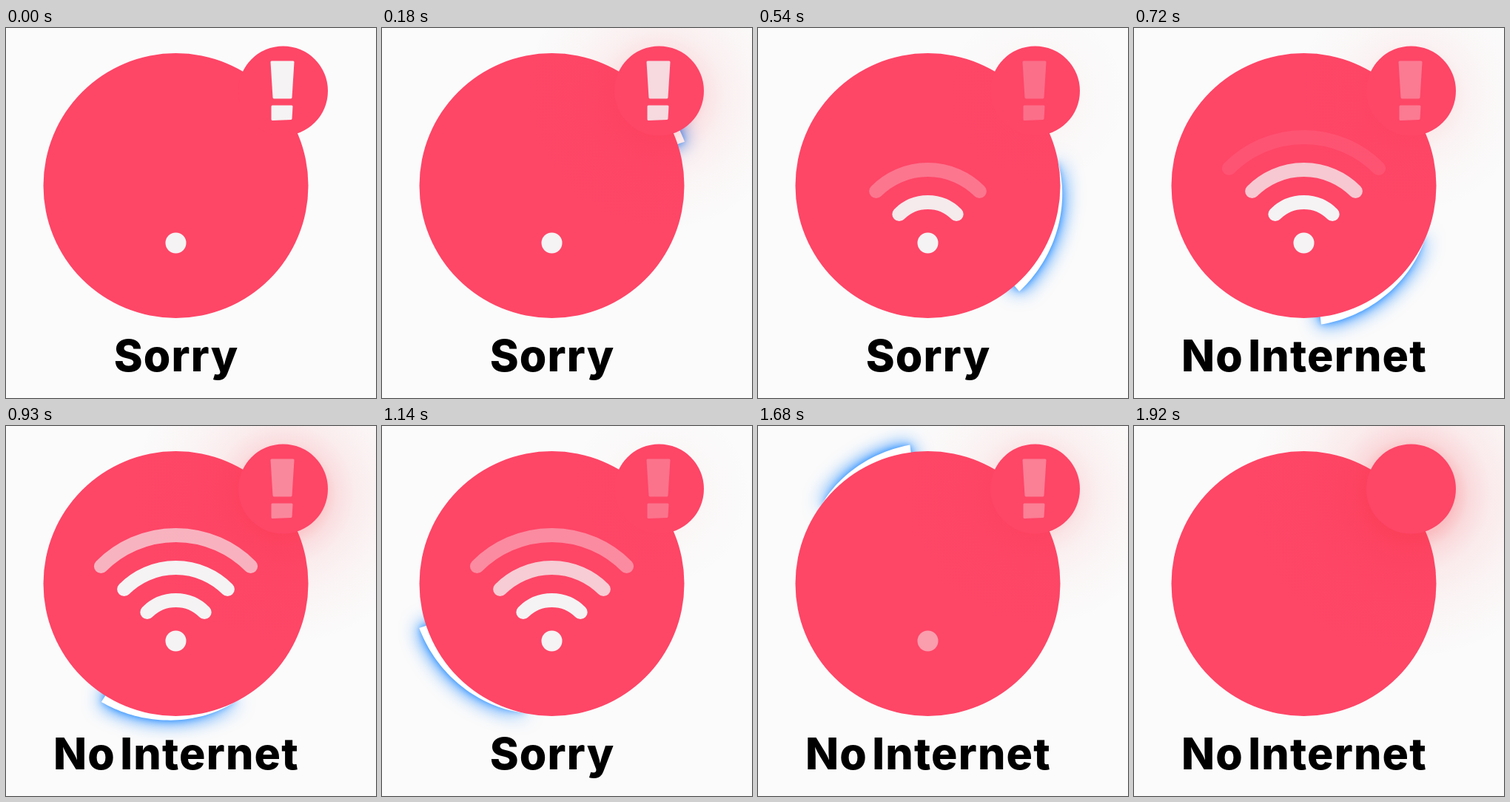
Recreate the animation shown at these times as an HTML page. Size 500x500 px, loop 1950 ms.

```html
<!DOCTYPE html>
<html lang="en">
<head>
<meta charset="utf-8">
<title>No Internet</title>
<style>
  html, body { margin: 0; width: 100%; height: 100%; overflow: hidden; background: #fbfbfb; }
  svg { display: block; width: 100%; height: 100%; }
  .red { fill: #fe4667; }
  .light { fill: #f5f3f4; }
  .wave { fill: none; stroke: #f5f3f4; stroke-width: 19; stroke-linecap: round; }
  text {
    font: 800 59px Inter, "Open Sans", sans-serif;
    letter-spacing: 1.2px; word-spacing: -8px; text-anchor: middle;
  }
</style>
</head>
<body>
<svg viewBox="0 0 500 500">
  <defs>
    <filter id="blue" filterUnits="userSpaceOnUse" x="0" y="0" width="500" height="500" color-interpolation-filters="sRGB">
      <feDropShadow dx="0" dy="0" stdDeviation="4" flood-color="#1484ff" flood-opacity=".65"/>
      <feDropShadow dx="0" dy="0" stdDeviation="13" flood-color="#0a7dff"/>
    </filter>
    <radialGradient id="halo">
      <stop offset=".26" stop-color="#f5333f" stop-opacity=".33"/>
      <stop offset=".35" stop-color="#f5333f" stop-opacity=".18"/>
      <stop offset=".48" stop-color="#f5333f" stop-opacity=".09"/>
      <stop offset=".68" stop-color="#f5333f" stop-opacity=".04"/>
      <stop offset="1" stop-color="#f5333f" stop-opacity="0"/>
    </radialGradient>
  </defs>

  <path id="sweep" fill="#fff" filter="url(#blue)"/>
  <circle class="red" cx="229.5" cy="213" r="179"/>
  <circle id="glow" cx="375" cy="92" fill="url(#halo)"/>
  <circle class="red" cx="374.5" cy="85" r="60.5"/>
  <path id="mark" class="light" stroke="#f5f3f4" stroke-width="3" stroke-linejoin="round"
    d="M359 46H388L385 94H362ZM360 106H386L385 122.5 360 123.5Z"/>

  <circle id="dot" class="light" cx="229.5" cy="290.5" r="14"/>
  <path id="wave0" class="wave"/>
  <path id="wave1" class="wave"/>
  <path id="wave2" class="wave"/>
  <text id="label" x="230" y="464">Sorry</text>
</svg>
<script>
  const LOOP = 1950, STEP = 30, TRAIL = 60;
  const CX = 229.5, CY = 213;
  const el = id => document.getElementById(id);
  const unit = v => Math.min(1, Math.max(0, v));
  const fade = (id, v) => { el(id).style.opacity = unit(v); };

  function polar(cy, r, deg) {
    const a = deg * Math.PI / 180;
    return (CX + r * Math.cos(a)).toFixed(2) + ' ' + (cy + r * Math.sin(a)).toFixed(2);
  }

  // Linear interpolation through [time, value] pairs
  function track(t, keys) {
    const i = Math.max(1, keys.findIndex(([time]) => t < time));
    const [[t0, v0], [t1, v1]] = [keys[i - 1], keys[i]];
    return v0 + (v1 - v0) * unit((t - t0) / (t1 - t0));
  }

  const waves = [0, 1, 2];
  const markKeys = [[0, 1], [330, .74], [540, .24], [930, .38], [1140, .26], [1440, .66], [1920, 0], [LOOP, 0]];

  for (const i of waves) {
    const r = 54.5 + 44 * i;
    el('wave' + i).setAttribute('d', `M${polar(290, r, -135.2)}A${r} ${r} 0 0 1 ${polar(290, r, -44.8)}`);
  }

  // Tapered rim that leaves from behind the badge and returns there
  function sweepPath(t) {
    const head = -52 + .1873 * t;
    const length = TRAIL * unit((1890 - t) / 270);
    const tail = Math.max(head - length, -50);
    if (head <= tail) return '';
    const outer = [], inner = [], n = 40;
    for (let i = 0; i <= n; i++) {
      const a = tail + (head - tail) * i / n;
      const k = unit(1 - (head - a) / length);
      outer.push(polar(CY, 178 + 11 * k ** .7, a));
      inner.unshift(polar(CY, 177 - 40 * k, a));
    }
    return 'M' + [...outer, ...inner].join('L') + 'Z';
  }

  function draw(t) {
    // Waves rise from the inside out and leave from the outside in
    for (const i of waves) {
      fade('wave' + i, Math.min((t - 180 - 255 * i) / 380, (1600 - 150 * i - t) / 400));
    }
    fade('dot', (1860 - t) / 360);
    fade('mark', track(t, markKeys));

    const glow = .8 * Math.abs(Math.sin(Math.PI * t / 600)) + .5 * (t / LOOP) ** 8;
    el('glow').setAttribute('r', 90 + 145 * glow);
    fade('glow', glow);

    el('sweep').setAttribute('d', sweepPath(t));
    el('label').textContent = t % (LOOP / 2) < 585 ? 'Sorry' : 'No Internet';
  }

  const start = performance.now();
  function tick() {
    const t = (performance.now() - start) % LOOP;
    draw(Math.floor(t / STEP) * STEP);
    requestAnimationFrame(tick);
  }
  draw(0);
  requestAnimationFrame(tick);
</script>
</body>
</html>
```
